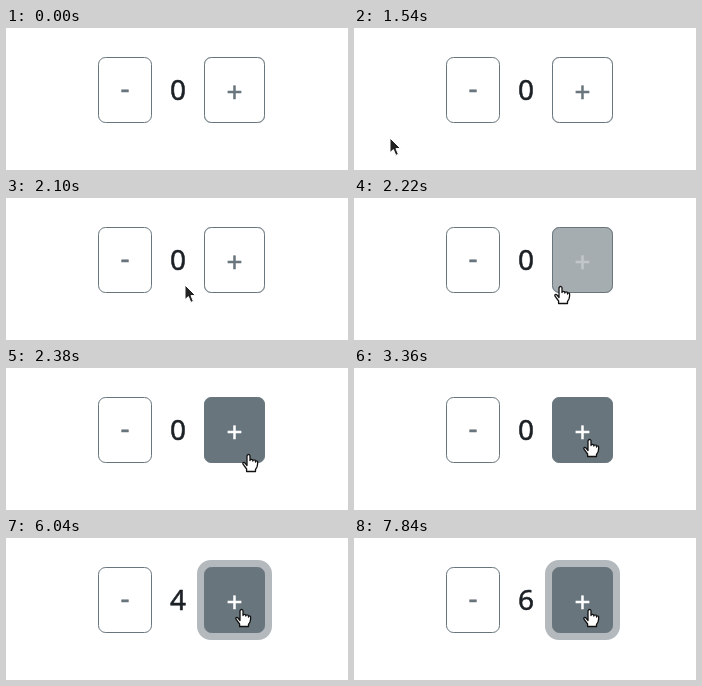
Recreate the animation shown at these times as an HTML page. Size 342x142 px, loop 8 s.

```html
<!DOCTYPE html>
<html lang="en">
<head>
<meta charset="utf-8">
<title>Counter</title>
<style>
  html, body { margin: 0; width: 100%; height: 100%; overflow: hidden; background: #fff; }
  svg { display: block; width: 342px; height: 142px; }
  text {
    font: 28px "Noto Sans", "Open Sans", sans-serif;
    text-anchor: middle;
    fill: currentColor;
    stroke: currentColor;
    stroke-width: .5;
  }
  .box { fill: #fff; stroke: #68757c; }
</style>
</head>
<body>
<svg viewBox="0 0 342 142">
  <rect class="box" x="92.5" y="29.5" width="53" height="65" rx="7"/>
  <text x="119" y="70" color="#68757c">-</text>
  <text id="count" x="172" y="72" color="#1c2126">0</text>
  <rect id="ring" x="198" y="29" width="61" height="66" rx="7" fill="#b3b9bd" stroke="#b3b9bd"/>
  <rect id="plus" class="box" x="198.5" y="29.5" width="60" height="65" rx="7"/>
  <text id="sign" x="228.5" y="74">+</text>
  <path id="arrow" fill="#222" stroke="#fff"
    d="M1 1V15.6L4.4 12.6 6.8 18.4 9.4 17.3 7 11.6H11.6Z"/>
  <path id="hand" fill="#fff" stroke="#111" stroke-width="1.3" stroke-linejoin="round"
    d="M6 11.5 4 9C2.8 7.8 1.2 8.8 2 10.2L5.6 15V17.5H14.5V15.5C16 13.5 16.6 12 16.6 10V8c0-1.6-2.1-1.6-2.1 0V7c0-1.6-2.7-1.6-2.7 0V6.5c0-1.6-2.8-1.6-2.8 0V2c0-2-3-2-3 0Z"/>
</svg>
<script>
const LOOP = 8000, FRAME = 20;
const SHOW = 1400, HOVER = 2155, NUDGE = 2260, PRESS = 3920;
const GRAY = [104, 117, 124], WHITE = [255, 255, 255];
const clicks = [4340, 5020, 5580, 6040, 7300, 7840];

// Pointer key points: time, x, y.
const path = [
  [1540, 35, 109], [1820, 146, 82], [1940, 146, 82], [2220, 199, 88],
  [NUDGE, 235, 86], [2520, 243, 83], [2800, 248, 81], [3080, 231, 71], [3360, 228, 71]
];

const $ = id => document.getElementById(id);
const clamp = x => Math.min(1, Math.max(0, x));
const easeOut = x => 1 - (1 - clamp(x)) ** 2;
const smooth = x => x * x * (3 - 2 * x);
const lerp = (a, b, k) => a + (b - a) * k;
const mix = (a, b, k) => `rgb(${a.map((v, i) => Math.round(lerp(v, b[i], k)))})`;

// The pointer glides up to the button, then moves in single jumps.
function pointer(t) {
  const i = Math.max(0, path.findLastIndex(p => p[0] <= t));
  const from = path[i], to = path[i + 1];
  if (!to || t >= NUDGE) return from.slice(1);
  const k = smooth(clamp((t - from[0]) / (to[0] - from[0])));
  return [1, 2].map(j => Math.round(lerp(from[j], to[j], k)));
}

function render(t) {
  const hover = easeOut((t - HOVER) / 180);
  $("plus").style.fill = mix(WHITE, GRAY, hover);
  $("sign").style.color = mix(GRAY, WHITE, hover);
  $("count").textContent = clicks.filter(c => c <= t).length;
  $("ring").style.strokeWidth = 14 * easeOut((t - PRESS) / 150);

  const over = t >= HOVER, move = `translate(${pointer(t)})`;
  for (const [id, on] of [["arrow", t >= SHOW && !over], ["hand", over]]) {
    $(id).setAttribute("transform", move);
    $(id).style.display = on ? "" : "none";
  }
}

const start = performance.now();
function tick() {
  const t = (performance.now() - start) % LOOP;
  render(Math.floor(t / FRAME) * FRAME);
  requestAnimationFrame(tick);
}
tick();
</script>
</body>
</html>
```
